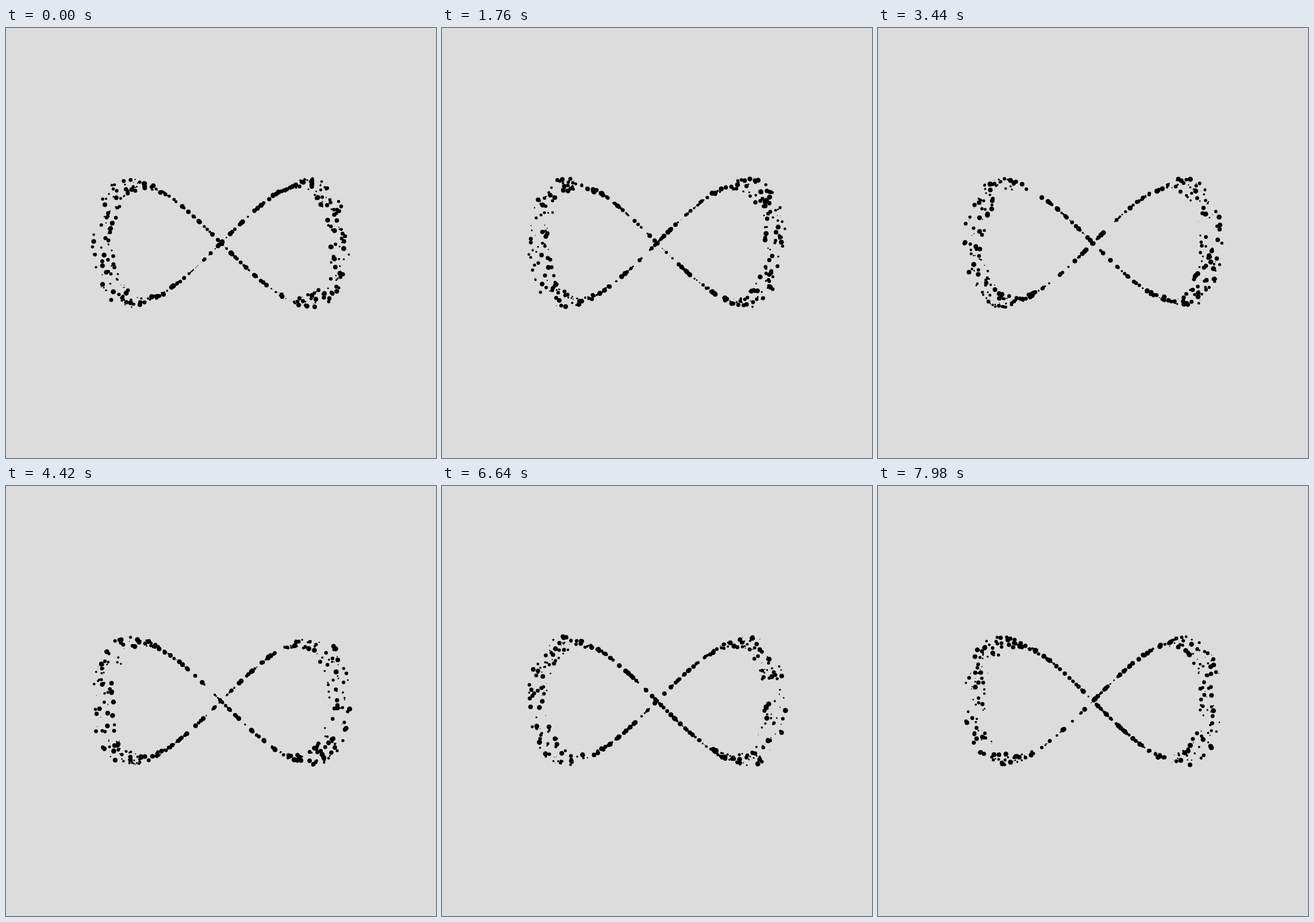
An HTML page with a canvas for the animation above (8 s loop, 748 by 748 pixels).

```html
<!DOCTYPE html>
<html lang="en">
<head>
<meta charset="utf-8">
<title>Infinity of dots</title>
<style>
  html, body { margin: 0; height: 100%; overflow: hidden; background: #dcdcdc; }
  canvas { display: block; }
</style>
</head>
<body>
<canvas id="stage" width="748" height="748"></canvas>
<script>
const SIZE = 748, MID = SIZE / 2, TURN = 2 * Math.PI;
const LOOP = 8000, COUNT = 420;
const ctx = document.getElementById('stage').getContext('2d');

let seed = 7;
function random(min, max) {
  seed = (seed + 0x6D2B79F5) | 0;
  let n = Math.imul(seed ^ (seed >>> 15), 1 | seed);
  n = (n + Math.imul(n ^ (n >>> 7), 61 | n)) ^ n;
  return min + (max - min) * ((n ^ (n >>> 14)) >>> 0) / 4294967296;
}

// Each dot keeps its own reach, size and speed (radians per second)
const dots = Array.from({ length: COUNT }, (_, i) => ({
  angle: (i + random(0, 4)) / COUNT * TURN,
  reach: SIZE * random(0.25, 0.3),
  speed: random(0.2, 0.47),
  radius: SIZE * random(0.0005, 0.006)
}));

function draw(time) {
  const seconds = (time % LOOP) / 1000;
  ctx.fillStyle = '#dcdcdc';
  ctx.fillRect(0, 0, SIZE, SIZE);
  ctx.fillStyle = '#000';
  for (const { angle, reach, speed, radius } of dots) {
    const a = angle + speed * seconds;
    const x = reach * Math.sin(a);
    ctx.beginPath();
    ctx.arc(MID + x, MID - x * Math.cos(a), radius, 0, TURN);
    ctx.fill();
  }
}

const start = performance.now();
function tick() {
  draw(performance.now() - start);
  requestAnimationFrame(tick);
}
tick();
</script>
</body>
</html>
```
